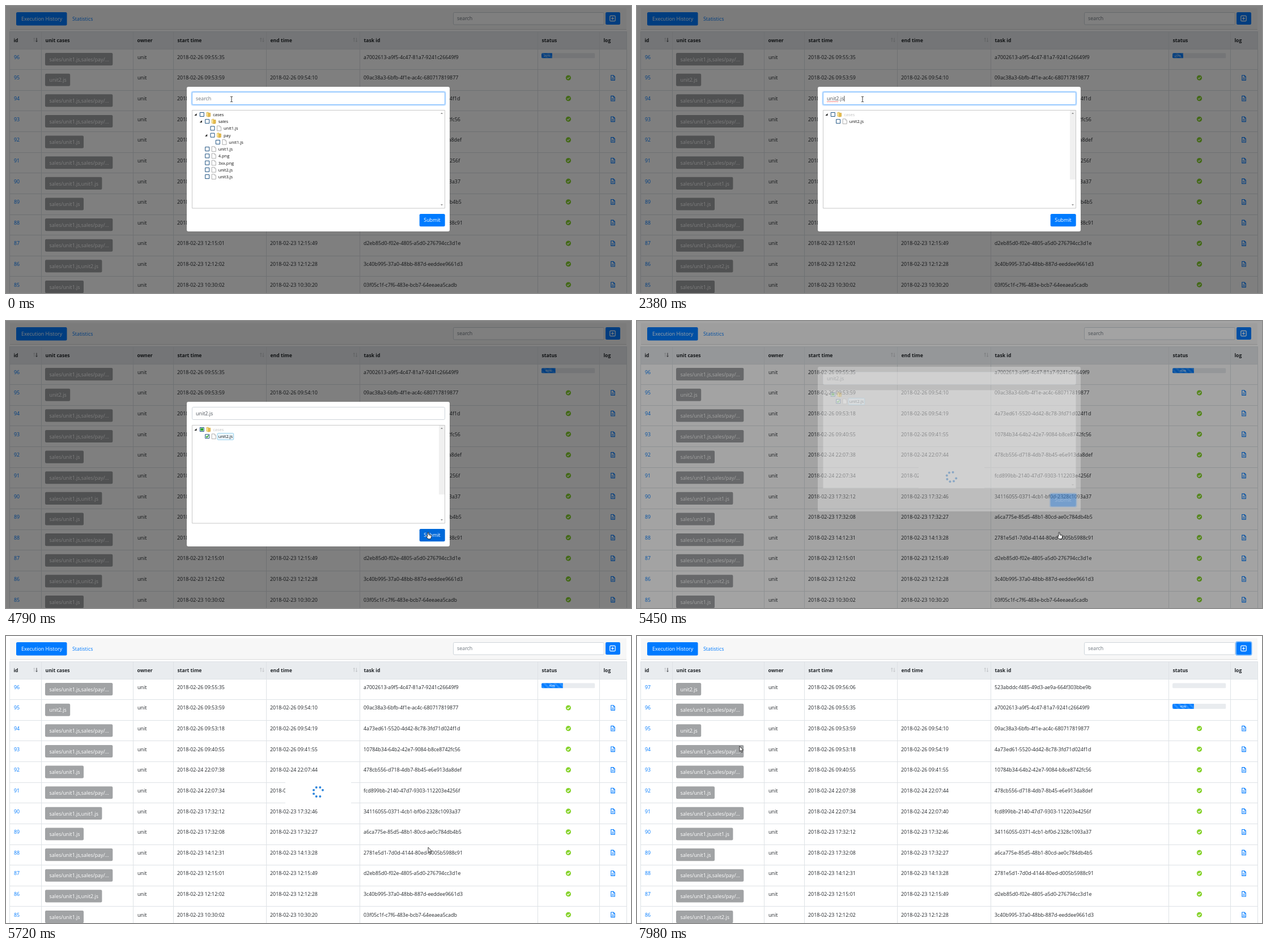
An HTML page with a canvas that plays this animation: 1103x508 px, repeating every 8 s.

```html
<!DOCTYPE html>
<html lang="en">
<head>
<meta charset="utf-8">
<title>Execution History</title>
<style>
  html, body { margin: 0; width: 100%; height: 100%; overflow: hidden; background: #fff; }
  canvas { display: block; }
</style>
</head>
<body>
<canvas id="stage" width="1103" height="508"></canvas>
<script>
const ctx = document.getElementById('stage').getContext('2d');
const LOOP = 8000;
const BLUE = '#007bff', INK = '#212529', LINE = '#dee2e6', PALE = '#e9ecef';
const FAMILY = '"Open Sans", "Noto Sans", sans-serif';
const ROW_H = 36.63;
const COLUMNS = [6, 62, 224, 295, 459, 624, 938, 1047, 1095];

const PAY = 'sales/unit1.js,sales/pay/...';
const ROWS = [
  [97, 'unit2.js', '2018-02-26 09:56:06', '', '523abddc-f485-49d3-ae9a-664f303bbe9b'],
  [96, PAY, '2018-02-26 09:55:35', '', 'a7002613-a9f5-4c47-81a7-9241c26649f9'],
  [95, 'unit2.js', '2018-02-26 09:53:59', '2018-02-26 09:54:10', '09ac38a3-6bfb-4f1e-ac4c-680717819877'],
  [94, PAY, '2018-02-26 09:53:18', '2018-02-26 09:54:19', '4a73ed61-5520-4d42-8c78-3fd71d024f1d'],
  [93, PAY, '2018-02-26 09:40:55', '2018-02-26 09:41:55', '10784b34-64b2-42e7-9084-b8ce8742fc56'],
  [92, 'sales/unit1.js', '2018-02-24 22:07:38', '2018-02-24 22:07:44', '478cb556-d718-4db7-8b45-e6e913da8def'],
  [91, PAY, '2018-02-24 22:07:34', '2018-02-24 22:07:40', 'fcd899bb-2140-47d7-9303-112203e4256f'],
  [90, 'sales/unit1.js,unit1.js', '2018-02-23 17:32:12', '2018-02-23 17:32:46', '34116055-0371-4cb1-bf0d-2328c1093a37'],
  [89, 'sales/unit1.js', '2018-02-23 17:32:08', '2018-02-23 17:32:27', 'a6ca775e-85d5-48b1-80cd-ae0c784db4b5'],
  [88, PAY, '2018-02-23 14:12:31', '2018-02-23 14:13:28', '2781e5d1-7d0d-4144-80ed-d005b5988c91'],
  [87, PAY, '2018-02-23 12:15:01', '2018-02-23 12:15:49', 'd2eb85d0-f02e-4805-a5d0-276794cc3d1e'],
  [86, 'sales/unit1.js,unit2.js', '2018-02-23 12:12:02', '2018-02-23 12:12:28', '3c40b995-37a0-48bb-887d-eeddee9661d3'],
  [85, 'sales/unit1.js', '2018-02-23 10:30:02', '2018-02-23 10:30:20', '03f05c1f-c7f6-483e-bcb7-64eeaea5cadb']
];

// Tree nodes: label, depth, is folder
const TREE = [
  ['cases', 0, true], ['sales', 1, true], ['unit1.js', 2], ['pay', 2, true], ['unit1.js', 3],
  ['unit1.js', 1], ['4.png', 1], ['3xx.png', 1], ['unit2.js', 1], ['unit3.js', 1]
];

const KEYS = [400, 550, 700, 850, 1420, 1690, 1800, 1900];
const FILTER_ALL = 900, FILTER_ONE = 1800, SPELLED = 2100;
const CHECKED = 3790, PRESSED = 4920, CLOSING = 5330, RELOADED = 5870;

const CURSOR = [
  [2400, 398, 165], [2800, 372, 190], [3100, 345, 222], [3360, 354, 211], [3510, 356, 210],
  [3750, 355, 205], [3950, 355, 205], [4520, 700, 359], [4670, 745, 374], [6300, 745, 374],
  [6430, 739, 373], [6860, 705, 365], [7860, 292, 264], [7980, 181, 195]
];
const SHADE = [[5313, .5], [5441, .36], [5570, .26], [5720, 0]];

// The screen refreshes in bursts; each entry is first change, last change, count.
const BURSTS = [[0, 0, 1], [120, 1130, 8], [1280, 2250, 8], [2380, 3360, 8], [3510, 4520, 8],
  [4670, 5570, 8], [5720, 5870, 2], [6430, 6430, 1], [6860, 7860, 8], [7980, 7980, 1]];
const TICKS = BURSTS.flatMap(([a, b, n]) =>
  Array.from({ length: n }, (_, i) => Math.floor(n > 1 ? a + (b - a) * i / (n - 1) : a)));

const clamp = v => Math.max(0, Math.min(1, v));

function track(keys, t, field = 1) {
  if (t <= keys[0][0]) return keys[0][field];
  for (let i = 1; i < keys.length; i++) {
    const a = keys[i - 1], b = keys[i];
    if (t <= b[0]) return a[field] + (b[field] - a[field]) * (t - a[0]) / (b[0] - a[0]);
  }
  return keys[keys.length - 1][field];
}

function text(str, x, y, color = INK, size = 8.9, weight = 400, align = 'left') {
  ctx.font = `${weight} ${size}px ${FAMILY}`;
  ctx.textAlign = align;
  ctx.fillStyle = color;
  ctx.fillText(str, x, Math.round(y));
}

function rect(x, y, w, h, color) {
  ctx.fillStyle = color;
  ctx.fillRect(x, y, w, h);
}

function box(x, y, w, h, r, fill, stroke, width = 1) {
  ctx.beginPath();
  ctx.roundRect(x, y, w, h, r);
  if (fill) { ctx.fillStyle = fill; ctx.fill(); }
  if (stroke) { ctx.strokeStyle = stroke; ctx.lineWidth = width; ctx.stroke(); }
}

function shape(points, fill, stroke, width = 1, close = true) {
  ctx.beginPath();
  points.forEach(([x, y]) => ctx.lineTo(x, y));
  if (close) ctx.closePath();
  if (fill) { ctx.fillStyle = fill; ctx.fill(); }
  if (stroke) { ctx.strokeStyle = stroke; ctx.lineWidth = width; ctx.stroke(); }
}

const line = (points, color, width) => shape(points, null, color, width, false);

function at(x, y, draw) {
  ctx.save();
  ctx.translate(x, y);
  draw();
  ctx.restore();
}

function sortArrow(x, dir, color) {
  at(x, 60, () => {
    ctx.scale(1, dir);
    line([[0, -3.5], [0, 3.2]], color, .8);
    line([[-1.5, 1.7], [0, 3.4], [1.5, 1.7]], color, .8);
  });
}

function drawNav(focused) {
  rect(7, 4, 1088, 37, '#f7f7f7');
  rect(7, 41, 1088, 1, '#dcdcdc');
  box(18, 11, 89.5, 23.5, 2.3, BLUE);
  text('Execution History', 27, 26, '#fff');
  text('Statistics', 117, 26, BLUE);
  box(789.5, 11.5, 266, 21.5, 2, '#fff', '#ced4da');
  text('search', 796, 25, '#6c757d');
  if (focused) box(1056, 9.2, 29.5, 25.6, 3.5, 'rgba(0,123,255,.5)');
  box(1058, 11, 26, 22, 2.3, BLUE);
  box(1065.8, 17.3, 9.4, 9.4, 1.2, null, '#fff', 1.2);
  rect(1068, 21.4, 5, 1.2, '#fff');
  rect(1069.9, 19.5, 1.2, 5, '#fff');
}

function drawProgress(y, percent, label, t) {
  const width = 94.5 * percent / 100;
  ctx.save();
  ctx.beginPath();
  ctx.roundRect(945, y, 94.5, 9.3, 2.3);
  ctx.clip();
  rect(945, y, 94.5, 9.3, PALE);
  rect(945, y, width, 9.3, BLUE);
  ctx.beginPath();
  ctx.rect(945, y, width, 9.3);
  ctx.clip();
  const phase = 9.3 * (1 - t % 1000 / 1000);
  for (let x = 935 + phase - 18.6; x < 945 + width; x += 9.3)
    shape([[x, y], [x + 4.65, y], [x + 13.95, y + 9.3], [x + 9.3, y + 9.3]], 'rgba(255,255,255,.15)');
  if (percent) text(label, 945 + width / 2, y + 7, '#fff', 5.7, 400, 'center');
  ctx.restore();
}

function drawDone(y) {
  ctx.beginPath();
  ctx.arc(992.5, y, 4.6, 0, 7);
  ctx.fillStyle = '#87d32d';
  ctx.fill();
  line([[990.2, y + .1], [991.8, y + 1.7], [994.9, y - 1.5]], '#fff', 1.3);
}

function drawLog(y) {
  at(1071, y, () => {
    shape([[-3.2, -4.3], [1, -4.3], [3.3, -2], [3.3, 4.3], [-3.2, 4.3]], '#fff', BLUE, 1.1);
    line([[.9, -4.2], [.9, -1.8], [3.2, -1.8]], BLUE, .9);
    line([[-1.7, .3], [1.8, .3]], BLUE, .9);
    line([[-1.7, 2.2], [1.8, 2.2]], BLUE, .9);
  });
}

function drawTable(t) {
  const rows = t >= RELOADED ? ROWS : ROWS.slice(1);
  rect(6, 45, 1090, 31, PALE);
  rect(6, 45, 1090, 1, LINE);
  ['id', 'unit cases', 'owner', 'start time', 'end time', 'task id', 'status', 'log']
    .forEach((name, i) => text(name, COLUMNS[i] + 7.5, 64, INK, 8.6, 700));
  [54, 454, 618.5].forEach((x, i) => {
    sortArrow(x - 4.2, -1, '#b9bcbf');
    sortArrow(x, 1, i ? '#b9bcbf' : INK);
  });

  const grown = clamp((t - 4450) / 600);
  const percent = 20 + 20 * grown * grown * (3 - 2 * grown);
  rows.forEach(([id, cases, start, end, task], i) => {
    const top = ROW_H * i, base = 93.8 + top, mid = 90.4 + top;
    rect(6, Math.round(75.5 + top), 1090, 1, LINE);
    text(id, 14, base, BLUE);
    ctx.font = `400 8.9px ${FAMILY}`;
    box(69, 83 + top, ctx.measureText(cases).width + 14, 22.2, 2.3, '#a1a3a5');
    text(cases, 76.5, 97.8 + top, '#fff');
    text('unit', 232, base);
    text(start, 302, base);
    text(end, 466, base);
    text(task, 631, base);
    if (end) {
      drawDone(mid);
      drawLog(mid);
    } else {
      drawProgress(83.2 + top, id === 97 ? 0 : percent, t < 4450 ? '20%' : '40%', t);
    }
  });
  COLUMNS.forEach(x => rect(x, 45, 1, 463, LINE));
}

function drawSpinner(t) {
  const x = t < 5700 ? 555 : 551;
  rect(x - 58, 256, 116, 42, '#fff');
  const gap = (22.5 + (t - 5720) * .18) * Math.PI / 180;
  ctx.fillStyle = '#2f86dc';
  for (let i = 1; i < 8; i++) {
    const a = gap + i * Math.PI / 4;
    ctx.beginPath();
    ctx.arc(x + 8.6 * Math.cos(a), 276 + 8.6 * Math.sin(a), 2, 0, 7);
    ctx.fill();
  }
}

function drawCheckbox(x, y, state) {
  box(x - 3.5, y - 3.5, 7, 7, 0, '#fff', '#1c5180', 1);
  if (state === 'partial') rect(x - 2.3, y - 2.3, 4.6, 4.6, '#21a121');
  if (state === 'on') line([[x - 2, y - .2], [x - .5, y + 1.8], [x + 2.2, y - 2]], '#21a121', 1.4);
}

function drawFolder(x, y) {
  at(x, y, () => {
    shape([[-3.6, -3.5], [-.2, -4.3], [-.2, 4.2], [-3.6, 3]], '#f3d675', '#d9b44a', .6);
    shape([[0, -2.6], [3.4, -2.6], [3.4, 3.6], [0, 4.2]], '#e6bc4c', '#c99c32', .6);
    line([[-2.4, -2.6], [-2.4, 2.4]], '#fff3c4', .9);
  });
}

function drawFile(x, y) {
  at(x, y, () => {
    shape([[-3.5, -4.4], [1.3, -4.4], [3.6, -2.1], [3.6, 4.4], [-3.5, 4.4]], '#fdfdfd', '#9b9b9b', .8);
    line([[1.2, -4.2], [1.2, -2], [3.4, -2]], '#b5b5b5', .7);
  });
}

function drawTree(t) {
  const one = t >= FILTER_ONE, filtered = t >= FILTER_ALL, checked = t >= CHECKED;
  const shown = TREE.filter(([name], i) =>
    one ? i === 0 || name === 'unit2.js' : !filtered || !name.endsWith('.png'));
  shown.forEach(([name, depth, folder], i) => {
    const x = 365.3 + 9.35 * depth, y = 192 + 12.23 * i;
    if (folder) shape([[x - 28.8, y - 2], [x - 28.8, y + 2], [x - 33, y + 2]], '#222');
    drawCheckbox(x - 19.5, y, checked && (folder ? 'partial' : 'on'));
    (folder ? drawFolder : drawFile)(x - 8, y);
    if (one && !folder && t >= 3300)
      box(x - 1.5, y - 5.5, 28.5, 11.5, 1, '#eef8fe', '#8fcdea', 1);
    text(name, x, y + 3, folder && filtered ? '#c3c3c3' : '#111', 7.5);
  });
}

function drawInput(t) {
  const focused = t < CHECKED;
  if (focused) box(326.5, 150.5, 450, 26, 3.5, 'rgba(0,123,255,.25)');
  box(328.5, 152.5, 446, 22, 2.3, '#fff', focused ? '#80bdff' : '#ced4da');
  const typed = 'unit2.js'.slice(0, KEYS.filter(k => k <= t).length);
  text(typed || 'search', 335, 167, typed ? '#495057' : '#6c757d');
  if (t >= SPELLED && focused) {
    const wave = Array.from({ length: 15 }, (_, i) => [335 + i * 1.45, 168.6 + i % 2 * 1.2]);
    line(wave, '#e33', .7);
  }
  const lastKey = Math.max(120, ...KEYS.filter(k => k <= t));
  if (focused && t >= 120 && (t - lastKey) % 1060 < 530)
    rect(335 + (typed ? ctx.measureText(typed).width + .3 : 0), 159, .8, 10, '#222');
}

function drawModal(t) {
  const leaving = clamp((t - CLOSING) / 110);
  ctx.save();
  ctx.globalAlpha = 1 - .72 * leaving;
  ctx.translate(0, -62 * leaving);
  box(319, 143, 464, 256, 3, '#fff');
  drawInput(t);
  box(328.5, 184.5, 446, 173.5, 0, '#fff', '#c8c8c8');
  if (t >= FILTER_ALL && t < CLOSING) rect(764, 185, 10, 122, '#f0f0f0');
  shape([[767, 191], [771, 191], [769, 188.8]], '#8a8a8a');
  shape([[767, 351], [771, 351], [769, 353.2]], '#8a8a8a');
  drawTree(t);
  const pressed = t >= PRESSED;
  if (pressed) box(727.8, 366, 48.8, 26, 3.5, 'rgba(0,123,255,.5)');
  box(729.7, 368, 45, 22.2, 2.3, pressed || t >= 4600 ? '#0069d9' : BLUE);
  text('Submit', 752, 382, '#fff', 8.9, 400, 'center');
  ctx.restore();
}

function drawBeam() {
  const half = [[-2, -4.6], [-.7, -4.6], [0, -4], [.7, -4.6], [2, -4.6]];
  line(half, '#222', .9);
  line(half.map(([x, y]) => [x, -y]), '#222', .9);
  line([[0, -4], [0, 4]], '#222', .9);
}

function drawArrow() {
  shape([[0, 0], [0, 9.4], [2.1, 7.5], [3.6, 10.9], [5.1, 10.3], [3.7, 7], [6.6, 7]], '#fff', '#111', .8);
}

function drawHand() {
  shape([[-.9, .4], [0, 0], [1, .5], [1, 4], [2.6, 4.1], [3.8, 4.5], [5.4, 5], [5.8, 6],
    [5.4, 9], [4.4, 11.8], [-.3, 11.8], [-2, 9.2], [-3.4, 7], [-2.6, 6.2], [-.9, 7.5]], '#fff', '#111', .8);
  line([[2.5, 4.4], [2.5, 6.4]], '#111', .6);
  line([[4, 5], [4, 6.6]], '#111', .6);
}

function drawCursor(t) {
  const x = track(CURSOR, t, 1), y = track(CURSOR, t, 2);
  const onButton = t >= 4600 && t < 5700;
  at(x, y, onButton ? drawHand : t < 3000 && y < 176 ? drawBeam : drawArrow);
}

function render(t) {
  rect(0, 0, 1103, 508, '#fff');
  drawNav(t >= RELOADED);
  drawTable(t);
  if (t >= 5400 && t < RELOADED) drawSpinner(t);
  const shade = track(SHADE, t);
  if (shade > 0) rect(0, 0, 1103, 508, `rgba(0,0,0,${shade})`);
  if (t < 5500) drawModal(t);
  drawCursor(t);
}

function tick() {
  const t = performance.now() % LOOP;
  render(TICKS.filter(k => k <= t).pop());
  requestAnimationFrame(tick);
}
tick();
</script>
</body>
</html>
```
